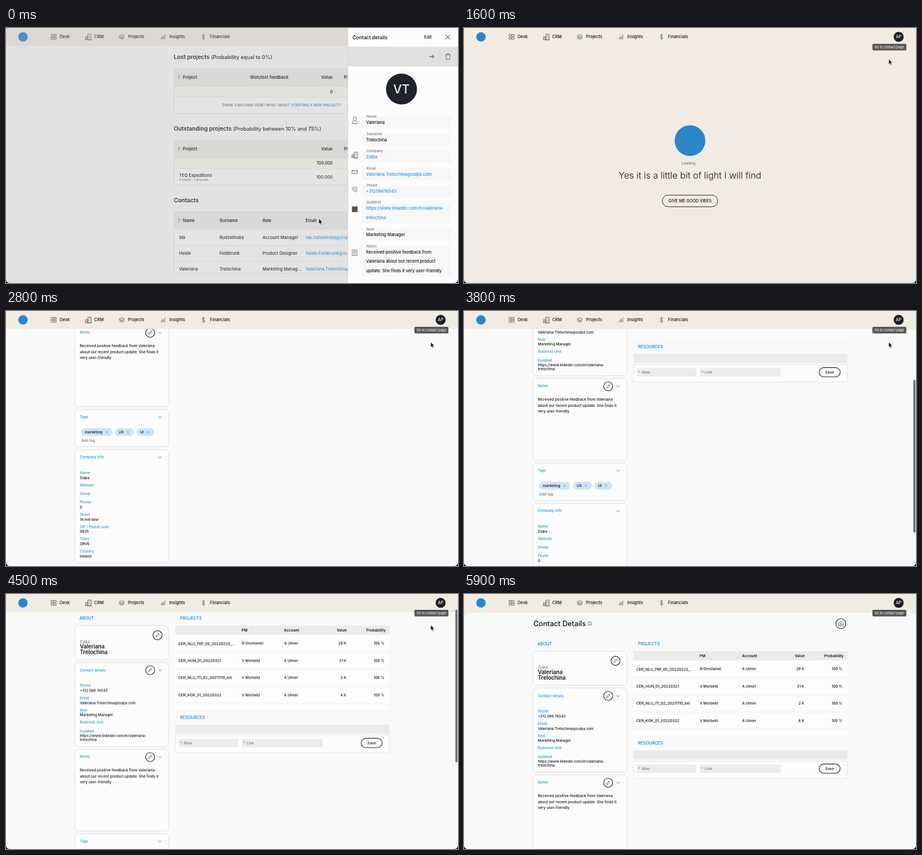
An HTML page that plays this animation: 800 by 452 pixels, repeating every 6 s.

```html
<!DOCTYPE html>
<html lang="en">
<head>
<meta charset="utf-8">
<title>Contact page</title>
<style>
html, body { margin: 0; width: 100%; height: 100%; overflow: hidden; background: #000; }
svg { display: block; width: 100vw; height: 100vh; font-family: Inter, Roboto, sans-serif; font-weight: 450; }
text { fill: #141414; white-space: pre; }
.b { font-weight: 600; }
.m { font-weight: 500; }
.l { font-weight: 350; }
.blue { fill: #2492ec; }
.gray { fill: #777; }
.white { fill: #f4f4f2; }
.e { text-anchor: end; }
.c { text-anchor: middle; }
.ico { fill: none; stroke: #555; stroke-width: .8; stroke-linejoin: round; stroke-linecap: round; }
.ring { fill: none; stroke: #1d1d1d; stroke-width: 1.1; }
.card { fill: #fcfcfc; stroke: #dcdcdc; stroke-width: .9; }
#crm, #loading, #contact, #overlay, #panel, #tip, #bar, #cursor, #scroll {
  animation: 6s step-end infinite;
}
</style>
</head>
<body>
<svg id="stage" viewBox="0 0 800 452" preserveAspectRatio="none"></svg>
<script>
const LOOP = 6000;
const first = 'Valeriana', last = 'Trelochina', firm = 'Zulpa';
const mail = `${first}.${last}@zulpa.com`;
const url = ['https://www.linkedin.com/in/valeriana-', 'trelochina'];

// y is the vertical middle of the capitals
const T = (x, y, size, str, cls = '') =>
  `<text x="${x}" y="${(y + size * .35).toFixed(2)}" font-size="${size}" class="${cls}">${str}</text>`;
const R = (x, y, w, h, fill, rx = 0, more = '') =>
  `<rect x="${x}" y="${y}" width="${w}" height="${h}" rx="${rx}" fill="${fill}" ${more}/>`;
const C = (x, y, r, fill) => `<circle cx="${x}" cy="${y}" r="${r}" fill="${fill}"/>`;
const I = (x, y, d) => `<path class="ico" transform="translate(${x} ${y})" d="${d}"/>`;
const G = (id, body) => `<g id="${id}">${body}</g>`;
const card = (y, h) => `<rect class="card" x="121.7" y="${y}" width="166.4" height="${h}" rx="7"/>`;
const ring = (x, y, r) => `<circle class="ring" cx="${x}" cy="${y}" r="${r}"/>`;
const chevron = y => I(272.5, y, 'M-2.7 -1.2L0 1.5 2.7 -1.2');
const edit = (x, y) => ring(x, y, 8) +
  I(x, y, 'M-2.8 2.9L-2.2 .8 1.7 -3.1 3 -1.8 -.9 2.1ZM.9 -2.3L2.2 -1');

const building = 'M-5 5V-.5H-1V5M-1 5V-5H5V5ZM-5.5 5H5.5M-3.6 1.5H-2.4M-3.6 3.2H-2.4M.8 -3H1.2M2.8 -3H3.2M.8 -.6H1.2M2.8 -.6H3.2M.8 1.8H1.2M2.8 1.8H3.2';

function nav() {
  const items = [[95, 'Desk'], [156, 'CRM'], [216, 'Projects'], [289, 'Insights'], [361, 'Financials']];
  return C(30, 15.8, 8.3, '#2a86c9') +
    I(84.5, 15.7, 'M-4.3 -4.3H-.8V-.8H-4.3ZM.8 -4.3H4.3V-.8H.8ZM-4.3 .8H-.8V4.3H-4.3ZM.8 .8H4.3V4.3H.8Z') +
    I(145.7, 15.7, building) +
    I(205, 15.7, 'M-4.2 -1.8L0 -4 4.2 -1.8 0 .4ZM-4.2 .2L0 2.4 4.2 .2M-4.2 2.2L0 4.4 4.2 2.2') +
    I(278, 15.7, 'M-3 4V1M-1 4V-1.5M1 4V-.3M3 4V-4') +
    I(349.6, 15.7, 'M0 -5V5M2.2 -2.2C2 -4.2 -2.2 -4.2 -2.2 -1.8S2.3 -.3 2.3 1.9 -2.2 4.2 -2.4 2') +
    items.map(([x, s]) => T(x, 15.7, 7.4, s, 'm')).join('') +
    C(769.3, 15.7, 8.9, '#1c1e26') + T(769.3, 15.7, 7.3, 'AP', 'white m c');
}

function table(y, h, lines) {
  return R(297.5, y, 340, h, '#fbfbfb', 0, 'stroke="#d8d8d8" stroke-width=".8"') +
    R(297.5, y, 340, 31, '#ebebe9') +
    I(306.2, y + 15.5, 'M0 2.8V-2.8M-1.6 -1.2L0 -2.8 1.6 -1.2') +
    lines.map(d => R(297.5, y + d, 340, .8, '#e2e2e0')).join('');
}

function crm() {
  const heading = (y, a, x, b) => T(297, y, 10.1, a, 'b') + T(x, y, 9.15, b);
  const heads = (y, list) => list.map(([x, s, c = '']) => T(x, y, 7.45, s, 'b ' + c)).join('');
  const people = [
    ['Ida', 'Rudzelinska', 'Account Manager', 'ida.rudzelinska@zulpa.com'],
    ['Heide', 'Feldbrunk', 'Product Designer', 'Heide.Feldbrunk@zulpa.com'],
    [first, last, 'Marketing Manag...', mail]
  ];
  const cols = [306.5, 378, 454, 530.3];
  return R(0, 0, 800, 452, '#f9f9f9') + R(0, 0, 800, 32, '#f0ebe3') +
    heading(51.5, 'Lost projects', 363, '(Probability equal to 0%)') +
    table(72, 79.5, [31, 50]) + R(298, 104, 340, 18, '#f7f5ee') +
    heads(87.5, [[313, 'Project'], [432, 'Won/lost feedback'], [578, 'Value', 'e'], [598, 'Probability']]) +
    T(578, 113.2, 7, '0', 'b e') +
    T(382, 137, 6.2, 'THERE\'S NOTHING HERE! WHAT ABOUT', 'b gray') +
    T(505, 137, 6.25, 'STARTING A NEW PROJECT?', 'b blue') +
    heading(178.5, 'Outstanding projects', 402, '(Probability between 10% and 75%)') +
    table(199, 79.5, [31, 50]) + R(298, 231, 340, 18, '#f7f5ee') +
    heads(214.3, [[313, 'Project'], [578, 'Value', 'e'], [598, 'Probability']]) +
    T(578, 240, 7, '100.000', 'b e') +
    T(306.5, 261, 7.4, 'TEQ Expeditions') + T(578, 264, 7.4, '100.000', 'e') +
    T(306.5, 269, 5.3, 'P Velotti - J Brandek', 'gray') +
    heading(305, 'Contacts', 0, '') +
    table(325.5, 109.5, [31, 59.5, 88]) +
    heads(341.2, [[313, 'Name'], [378, 'Surname'], [454, 'Role'], [530.3, 'Email']]) +
    people.map((p, r) => p.map((s, i) =>
      T(cols[i], 371 + r * 28.4, 7.45, s, i === 3 ? 'blue' : '')).join('')).join('');
}

function panel() {
  const rows = [
    [157, 'Name', [first]], [187.5, 'Surname', [last]], [218, 'Company', [firm], 1],
    [248.5, 'Email', [mail], 1], [279, 'Phone', ['+31209876543'], 1], [309, 'Guildnet', url, 1],
    [356.3, 'Role', ['Marketing Manager']],
    [386.6, 'Notes', ['Received positive feedback from', first + ' about our recent product', 'update. She finds it very user-friendly']]
  ];
  return R(604.5, 0, 196, 452, '#fcfcfc') + R(604.5, 0, .8, 452, '#c4c4c4') +
    T(613.3, 16.6, 8.6, 'Contact details', 'm') + T(740, 16.6, 7.5, 'Edit', 'm') +
    '<path d="M778 12.3l8 8m0-8l-8 8" stroke="#1a1a1a" fill="none"/>' +
    R(605, 33, 195, 35.3, '#e0e0e0') + R(767.3, 42, .7, 18, '#d0d0d0') +
    '<path d="M749 50.8h8.3m-3.2-3.2l3.2 3.2-3.2 3.2" stroke="#222" stroke-width=".9" fill="none"/>' +
    I(782.3, 50.8, 'M-4.5 -3.5H4.5M-1.6 -3.5V-5H1.6V-3.5M-3.6 -3.5L-3.2 5H3.2L3.6 -3.5') +
    C(700, 108.2, 27.4, '#20222c') + T(700, 108.2, 21.5, 'VT', 'white c') +
    rows.map(([y, label, lines, link]) =>
      R(629, y, 159, 21 + (lines.length - 1) * 16.4, '#f7f7f7', 2) +
      T(638, y, 6.4, label, 'gray') +
      lines.map((s, i) => T(637.3, y + 10.6 + i * 16.4, 7.4, s, link ? 'blue' : '')).join('')).join('') +
    R(605, 441, 195, 11, '#fcfcfc') +
    I(617.2, 163.5, 'M-2.7 -3.4A2.7 2.7 0 0 1 2.7 -3.4V-1.8A2.7 2.7 0 0 1 -2.7 -1.8ZM-4.4 6.2V4.5Q-4.2 1.8 -1.6 1M4.4 6.2V4.5Q4.2 1.8 1.6 1M-4.4 6.2H4.4') +
    I(617.2, 225, building) +
    I(617.2, 255.3, 'M-4.5 -3H4.5V3H-4.5ZM-4.5 -3L0 .8 4.5 -3') +
    I(617.2, 286, 'M-4.2 -2.6L-2.4 -4.4 -.6 -1.8 -1.8 -.7Q-.8 1.2 1 2L2 .9 4.4 2.7 2.8 4.5C-.4 4.6 -4.4 .4 -4.2 -2.6ZM.6 -2.4A3 3 0 0 1 2.6 -.2M.8 -4.6A5 5 0 0 1 4.6 -.6') +
    R(612.3, 316.3, 10, 10, '#555') +
    I(617.2, 398.5, 'M-4 -5H4V5H-4ZM-2 -2.5H2M-2 0H2M-2 2.5H.5');
}

function loading() {
  return R(0, 0, 800, 452, '#f2ebe4') + C(400, 199.7, 27.2, '#2a86c9') +
    T(400, 239.3, 6.5, 'Loading...', 'gray c') +
    T(400, 261.4, 16, 'Yes it is a little bit of light I will find', 'l c') +
    R(351, 296.3, 98, 20.6, 'none', 10.3, 'stroke="#222"') +
    T(400, 306.7, 7.25, 'GIVE ME GOOD VIBES', 'm c');
}

function about() {
  const pairs = list => list.map(([y, label, ...vals]) => T(130.7, y, 6.4, label, 'blue') +
    vals.map((s, i) => T(130.7, y + 8.7 + i * 6.8, 6.3, s, 'm')).join('')).join('');
  const tags = [[133, 55, 'marketing', 178], [193, 33.5, 'UX', 215.8], [231, 31.5, 'UI', 251.5]];
  const title = (y, s) => T(130.7, y, 6.4, s, 'blue') + chevron(y + .5);
  const notes = [`Received positive feedback from ${first}`, 'about our recent product update. She finds it', 'very user-friendly'];
  return T(130, 88.6, 7.2, 'ABOUT', 'b blue') +
    card(101.5, 60.3) + edit(268.2, 118.4) +
    T(130.7, 130, 6.6, firm, 'gray') + T(130.7, 138.4, 9.7, first, 'b') + T(130.7, 148.2, 9.7, last, 'b') +
    card(166.6, 149.2) + title(180.3, 'Contact details') + edit(255.2, 180.5) +
    pairs([[208, 'Phone', '+312 098 76543'], [229.7, 'Email', mail], [251.5, 'Role', 'Marketing Manager'],
      [273.2, 'Business Unit'], [288.4, 'Guildnet', ...url]]) +
    card(320.5, 145) + title(334.1, 'Notes') + edit(255.2, 334.5) +
    notes.map((s, i) => T(130.7, 357.4 + i * 10.9, 6.5, s)).join('') +
    card(470.5, 66) + title(483.6, 'Tags') +
    tags.map(([x, w, s, cross]) => R(x, 503.7, w, 13.8, '#cfe4f8', 6.9) + T(x + 6.3, 510.7, 6.5, s) +
      `<path d="M${cross - 2} 508.7l4 4m0-4l-4 4" stroke="#4b9fe6" stroke-width=".8"/>`).join('') +
    T(133.3, 526, 6.5, 'Add tag', 'gray') +
    card(541.8, 200.8) + title(555, 'Company info') +
    pairs([[582.8, 'Name', firm], [604.6, 'Website'], [619.8, 'Group'], [635, 'Phone', '0'],
      [656.7, 'Street', '14 mill lane'], [678.4, 'ZIP / Postal code', '0835'],
      [700.2, 'Town', 'ORVE'], [721.9, 'Country', 'Ireland']]);
}

function projects() {
  const rows = [
    ['CER_NLU_FRF_05_20220223_...', 'N Drostamel', '28 K'], ['CER_HUN_01_20220321', 'V Morbeld', '31 K'],
    ['CER_NLU_ITI_02_20211110_ext', 'V Morbeld', '2 K'], ['CER_KOK_01_20220322', 'V Morbeld', '4 K']
  ];
  const input = (x, w, s) => R(x, 302.4, w, 14.5, '#ebecee', 1.5) +
    T(x + 2.7, 310.2, 7, '*', 'blue') + T(x + 8.5, 309.6, 6.6, s, 'gray');
  return T(308, 88.6, 7.3, 'PROJECTS', 'b blue') +
    R(299.7, 101.2, 379, 16.6, '#ebebea') + R(299.7, 117.8, 379, 133, '#fdfdfd') +
    T(417, 109.5, 6.6, 'PM', 'b') + T(492, 109.5, 6.6, 'Account', 'b') +
    T(603, 109.5, 6.5, 'Value', 'b e') + T(672, 109.5, 6.6, 'Probability', 'b e') +
    rows.map(([name, pm, value], i) => {
      const y = 133.2 + i * 30.45;
      return R(299.7, y + 13.2, 379, 4, '#f8f8f8') + T(305, y, 6.6, name) + T(417.3, y, 6.45, pm) +
        T(492.3, y, 6.45, 'A Ulmer') + T(602.3, y, 6.5, value, 'e') + T(670, y, 6.5, '100 %', 'e');
    }).join('') +
    T(308, 264.3, 7.3, 'RESOURCES', 'b blue') + R(299.7, 277, 379, 16.5, '#ebebea') +
    R(300.1, 296.2, 378.3, 30.8, '#fcfcfc', 0, 'stroke="#dfdfdf" stroke-width=".8"') +
    input(305.5, 105.5, 'Alias') + input(417.5, 143, 'Link') +
    R(628.5, 301.4, 37.3, 16.4, '#fff', 8.2, 'stroke="#1d1d1d" stroke-width="1.1"') +
    T(647.2, 309.6, 6.7, 'Save', 'm c');
}

function contact() {
  return R(0, 0, 800, 452, '#f0ebe3') +
    G('scroll', R(0, 33.2, 800, 760, '#f9f9f9', 9) +
      T(123, 52.8, 12.7, 'Contact Details') + I(222.6, 52.6, 'M-2.3 -3.2H2.3V3.2L0 1.3 -2.3 3.2Z') +
      ring(667, 52.6, 8.9) +
      I(667, 52.6, 'M-1.7 -2.5A1.7 1.7 0 0 1 1.7 -2.5V-1.5A1.7 1.7 0 0 1 -1.7 -1.5ZM-4.2 0V4H4.2V0L1.6 1.6H-1.6Z') +
      about() + projects()) +
    R(0, 0, 800, 31.8, '#f0ebe3') +
    G('bar', R(795.3, 0, 3.8, 271, '#707070', 1.9));
}

document.getElementById('stage').innerHTML =
  G('crm', crm()) + G('loading', loading()) + G('contact', contact()) + nav() +
  G('overlay', R(0, 0, 800, 452, '#a8a8a8', 0, 'opacity=".28"')) + G('panel', panel()) +
  G('tip', R(722.8, 28, 60.2, 11.8, '#585858', 2) + T(752.9, 34, 5.7, 'Go to contact page', 'white c')) +
  G('cursor', '<path d="M0 0V9L2 7.2 3.4 10.4 5 9.7 3.6 6.6H6.3Z" fill="#0a0a0a" stroke="#fff" stroke-width=".5"/>') +
  '<path d="M0 446V452H6A6 6 0 0 1 0 446ZM800 446V452H794A6 6 0 0 0 800 446Z"/>';

// Each stop is [ms, ...values]; values hold until the next stop.
function track(id, stops, css) {
  const body = stops.map(([t, ...v]) =>
    `${Math.max(0, (t - 2) / LOOP * 100).toFixed(4)}% { ${css(...v)} }`).join(' ');
  return `@keyframes ${id} { ${body} } #${id} { animation-name: ${id}; }\n`;
}
const fade = v => `opacity: ${v}`;
const move = (x, y) => `transform: translate(${x}px, ${y}px)`;

const rest = [751.8, 55.2];
const path = [[0, 553.7, 338], [100, 588, 285], [200, 657, 180], [300, 712, 95], [400, 733, 66],
  [600, 741, 60], [700, 749, 57], [800, ...rest], [4700, 751.5, 54], [4800, 749, 47],
  [4900, 743, 32], [5000, 734, 14], [5100, 721.5, -6.5], [5200, 720, -20]];
const scroll = [[0, 296], [3600, 288], [3700, 250], [3800, 201], [3900, 162], [4000, 134], [4100, 115],
  [4200, 105], [4300, 92], [4400, 70], [4500, 45.5], [4600, 25], [4700, 11], [4800, 3], [4900, -1.6],
  [5000, -1], [5100, -.6], [5200, -.3], [5300, 0]];
const barStops = scroll.map(([t, y]) => [t, y, t >= 3600 ? 1 : 0]).concat([[5400, 0, .6], [5500, 0, .25], [5600, 0, 0]]);

const sheet = document.createElement('style');
sheet.textContent =
  track('crm', [[0, 1], [1300, 0]], fade) +
  track('loading', [[0, 0], [1300, 1], [2000, 0]], fade) +
  track('contact', [[0, 0], [2000, 1]], fade) +
  track('overlay', [[0, 1], [1300, .65], [1400, .25], [1500, .06], [1600, 0]], fade) +
  track('panel', [[0, 0, 0], [1300, 68, 0], [1400, 146, 0], [1500, 186, 0], [1600, 200, 0]], move) +
  track('tip', [[0, 0], [800, .5], [900, 1]], fade) +
  track('cursor', path, move) +
  track('scroll', scroll, y => move(0, -y)) +
  track('bar', barStops, (y, o) => `${move(0, Math.max(0, y * .607).toFixed(1))}; ${fade(o)}`);
document.head.append(sheet);
</script>
</body>
</html>
```
